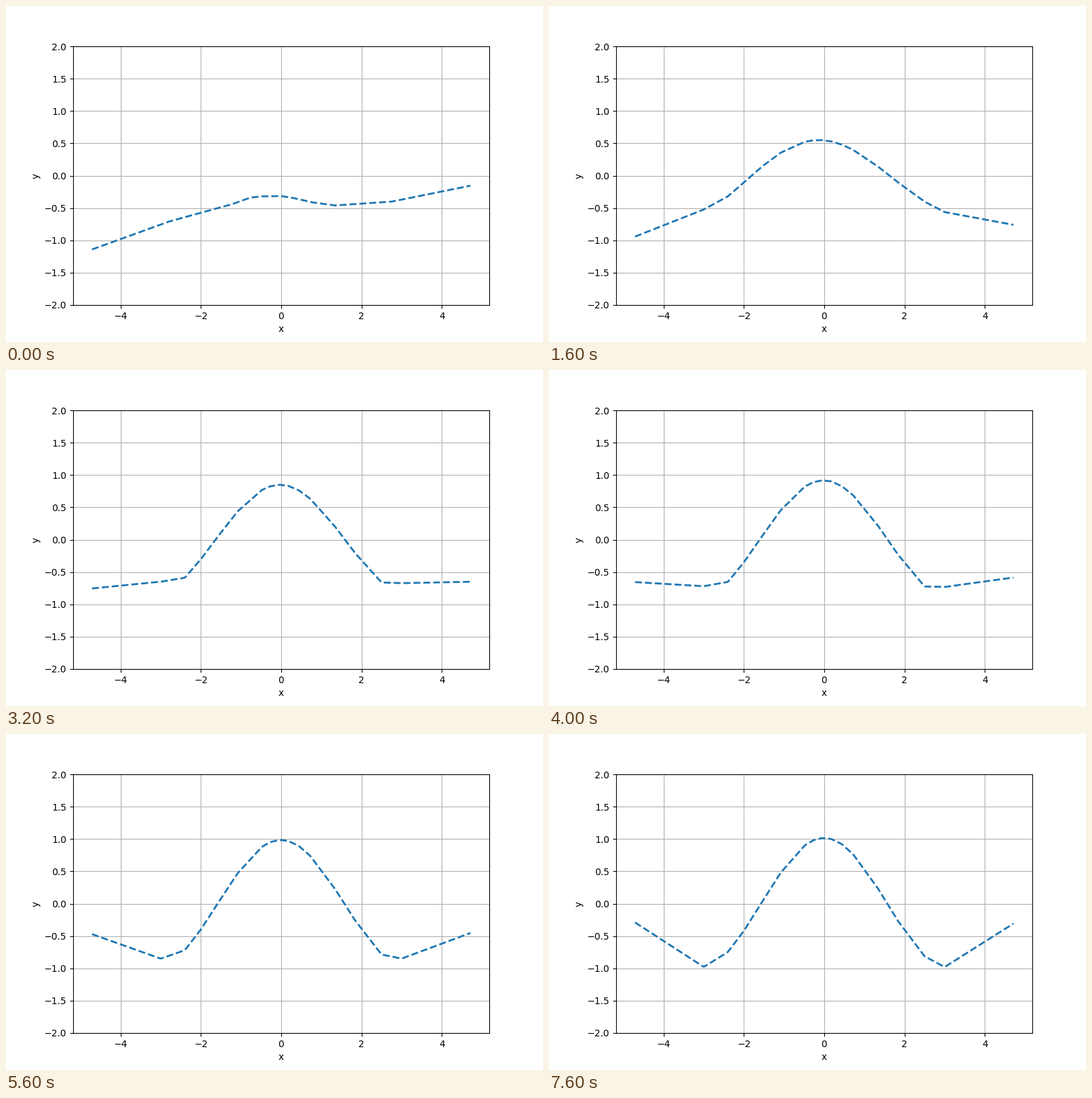
A matplotlib script that plays this animation: 800 by 500 pixels, repeating every 8 s.

```python
import numpy as np
import matplotlib.pyplot as plt
from matplotlib.animation import FuncAnimation

FRAMES, INTERVAL = 20, 400
HALF = 1.5 * np.pi
X = np.linspace(-HALF, HALF, 300)

# Bends of the fitted polyline between the two straight tails.
KNOTS = np.array([-2.4, -2, -1.54, -1.08, -0.48, -0.27, -0.05,
                  0.17, 0.44, 0.72, 1.34, 1.84, 2.5])
NODES = np.concatenate(([-HALF, -3], KNOTS, [3, HALF]))

# The untrained guess.
START = np.interp(X, [-HALF, -2.8, -1.22, -0.78, -0.5, 0, 0.3, 0.75, 1.34, 2.76, HALF],
                  [-1.14, -0.71, -0.44, -0.34, -0.32, -0.315, -0.345, -0.41, -0.46, -0.4, -0.155])


def left_tail(x, step):
    slope = 0.012 - 0.65 * np.tanh((step - 9) / 13.3)
    return -0.693 + slope * (x + 3.71)


def right_tail(x, step):
    slope = 0.122 + 0.55 * np.tanh((step - 11) / 14.9)
    return -0.662 + slope * (x - 3.81)


def tails(x, step):
    """Straight ends, each turning about a fixed point."""
    step = max(step, 4)
    return np.where(x < 0, left_tail(x, step), right_tail(x, step))


def wave(x, step):
    """Cosine that grows to full height."""
    error = 0.76 * np.exp(-(step - 2) / 4.2)
    return 1.03 * np.cos(x) - error * np.cos(1.12 * (x - 0.1))


def curve(step):
    y = np.where(np.abs(NODES) < 3, wave(NODES, step), tails(NODES, step))
    fit = np.maximum(np.interp(X, NODES, y), tails(X, step))
    guess = 0.25 ** (step - 1)
    return fit + guess * (START - fit)


fig, ax = plt.subplots(figsize=(8, 5), dpi=100)
ax.set_xlim(-1.1 * HALF, 1.1 * HALF)
ax.set_ylim(-2, 2)
ax.set_xlabel("x")
ax.set_ylabel("y")
ax.grid(True)
line, = ax.plot(X, START, "--", color="C0", lw=2)


def update(i):
    line.set_ydata(curve(max(i, 1)))
    return line,


anim = FuncAnimation(fig, update, frames=FRAMES, interval=INTERVAL,
                     repeat=True, repeat_delay=0)
plt.show()
```
